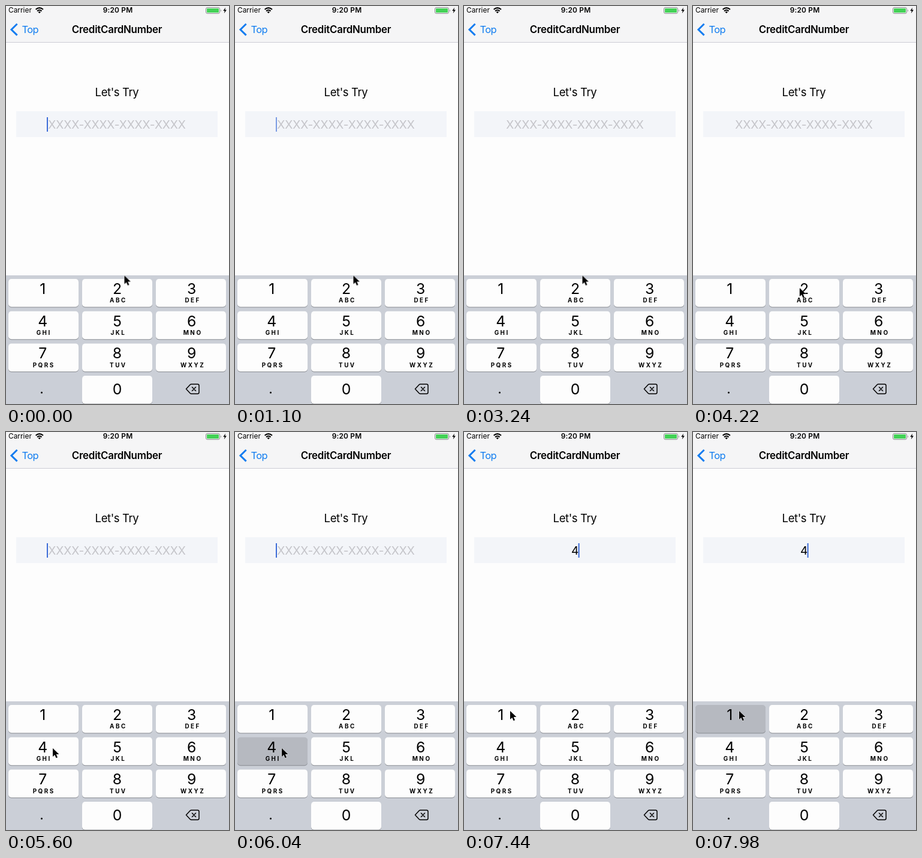
Write an HTML page that moves like this. It is 372x662 px and loops after 8 s.

```html
<!DOCTYPE html>
<html lang="en">
<head>
<meta charset="utf-8">
<title>Card number entry</title>
<style>
  html, body { margin: 0; width: 100%; height: 100%; overflow: hidden; background: #fdfdfd; }
  svg { display: block; width: 372px; height: 662px; font-family: Inter, "Open Sans", sans-serif; }
  .mid { text-anchor: middle; }
  .status { font-size: 11.9px; }
  .bold { font-weight: 600; }
  .title { font-size: 16.9px; letter-spacing: -.25px; }
  .back { font-size: 16.5px; letter-spacing: -.6px; }
  .prompt { font-size: 18.5px; letter-spacing: -.4px; }
  .entry { font-size: 19.2px; letter-spacing: -.13px; }
  .digit { font-size: 24.8px; }
  .letters { font-size: 9.9px; font-weight: 700; letter-spacing: 2.5px; }
</style>
</head>
<body>
<svg viewBox="0 0 372 662">
  <rect width="372" height="662" fill="#fdfdfd"/>
  <rect width="372" height="60" fill="#f5f5f6"/>
  <rect y="60" width="372" height="1" fill="#cdcdd6"/>

  <text class="status" x="4" y="11">Carrier</text>
  <g fill="none" stroke="#000" stroke-width="2">
    <path d="M49.6 5.8Q55.8 .4 62 5.8M52 8.4Q55.8 5 59.6 8.4"/>
  </g>
  <path d="M53.6 10Q55.8 8.2 58 10L55.8 12.2Z"/>
  <text class="status bold mid" x="186.5" y="11" letter-spacing=".2">9:20 PM</text>
  <rect x="333.5" y="2.5" width="23" height="10" rx="2.5" fill="none" stroke="#8a8a8e"/>
  <rect x="335" y="4" width="20" height="7" rx="1" fill="#43d256"/>
  <path d="M358 5.5q1.8 2 0 4z" fill="#8a8a8e"/>
  <path d="M366.2 2.5L362.3 8H364.8L363.8 12.3L368 6.6H365.3Z"/>

  <path d="M18.6 29.8L9 39.2L18.6 48.6" fill="none" stroke="#0f7cf0" stroke-width="3"/>
  <text class="back" x="26.5" y="45" fill="#0f7cf0">Top</text>
  <text class="title bold mid" x="185" y="44.7">CreditCardNumber</text>

  <text class="prompt mid" x="185" y="150.3">Let's Try</text>
  <rect x="17" y="175" width="336" height="43" fill="#f3f5f9"/>
  <g id="empty">
    <text class="entry mid" x="185" y="204" fill="#c4c4c9">XXXX-XXXX-XXXX-XXXX</text>
    <rect id="caret" x="68" y="185" width="2" height="24" fill="#3c6cd8"/>
  </g>
  <g id="typed" opacity="0">
    <text class="entry mid" x="185.2" y="204">4</text>
    <rect x="190.6" y="185" width="2" height="24" fill="#3c6cd8"/>
  </g>

  <rect y="448" width="372" height="214" fill="#cbcfd7"/>
  <g id="keys"></g>
  <circle cx="59.5" cy="643" r="1.5"/>
  <g fill="none" stroke="#000" stroke-width="1.5" stroke-linejoin="round" stroke-linecap="round">
    <path d="M300.5 637L307 630Q308 629 309.5 629H319.5Q322 629 322 631.5V642.5Q322 645 319.5 645H309.5Q308 645 307 644Z"/>
    <path d="M310.5 634L316.5 640M316.5 634L310.5 640"/>
  </g>
  <path id="pointer" d="M0 0V14L3.3 10.9L5.6 16.3L8 15.3L5.7 10H10.4Z" stroke="#fdfdfd" paint-order="stroke"/>
</svg>
<script>
const LOOP = 8000, TYPED = 6430;
const WHITE = '#fdfdfd', PRESSED = '#b6b9c0';
const $ = id => document.getElementById(id);

function add(parent, tag, attrs, text = '') {
  const el = document.createElementNS('http://www.w3.org/2000/svg', tag);
  for (const [name, value] of Object.entries(attrs)) el.setAttribute(name, value);
  el.textContent = text;
  return parent.appendChild(el);
}

function addKey(label, letters, col, row) {
  const x = 4 + col * 123, y = 454 + row * 53.7;
  const cx = 61.3 + col * 124.2; // labels sit slightly wider apart than the keys
  const box = { x, width: 117, height: 46.5, rx: 5 };
  add($('keys'), 'rect', { ...box, y: y + 1, fill: '#888b91' });
  const face = add($('keys'), 'rect', { ...box, y, fill: WHITE });
  add($('keys'), 'text', { class: 'digit mid', x: cx, y: y + (row < 3 ? 25 : 31) }, label);
  add($('keys'), 'text', { class: 'letters mid', x: cx + 1.9, y: y + 39.3 }, letters);
  return face;
}

const groups = ['', 'ABC', 'DEF', 'GHI', 'JKL', 'MNO', 'PQRS', 'TUV', 'WXYZ'];
const faces = groups.map((letters, i) => addKey(i + 1, letters, i % 3, Math.floor(i / 3)));
addKey(0, '', 1, 3);

// Steps are [time in ms, value, easing towards the next step].
function play(el, prop, steps, duration = LOOP) {
  const frames = steps.map(([ms, value, easing = 'linear']) =>
    ({ offset: ms / duration, [prop]: value, easing }));
  el.animate(frames, { duration, iterations: Infinity });
}

// Holds each value until the next step.
function hold(el, prop, steps) {
  const held = steps.map(([ms, value]) => [ms, value, 'step-end']);
  play(el, prop, [...held, [LOOP, steps.at(-1)[1]]]);
}

const at = (x, y) => `translate(${x}px, ${y}px)`;

play($('pointer'), 'transform', [
  [0, at(197.5, 448.5)],
  [3950, at(197.5, 448.5), 'ease-in'],
  [4220, at(178, 469)],
  [4850, at(78, 526)],
  [6560, at(78, 526), 'ease-in'],
  [6740, at(78, 491), 'ease-out'],
  [7100, at(77, 464)],
  [LOOP, at(77, 464)]
]);

play($('caret'), 'opacity', [[0, 1], [50, 1], [200, 0], [300, 0], [450, 1], [1000, 1]], 1000);
hold($('empty'), 'opacity', [[0, 1], [TYPED, 0]]);
hold($('typed'), 'opacity', [[0, 0], [TYPED, 1]]);
hold(faces[3], 'fill', [[0, WHITE], [5950, PRESSED], [TYPED, WHITE]]);
hold(faces[0], 'fill', [[0, WHITE], [7750, PRESSED]]);
</script>
</body>
</html>
```
